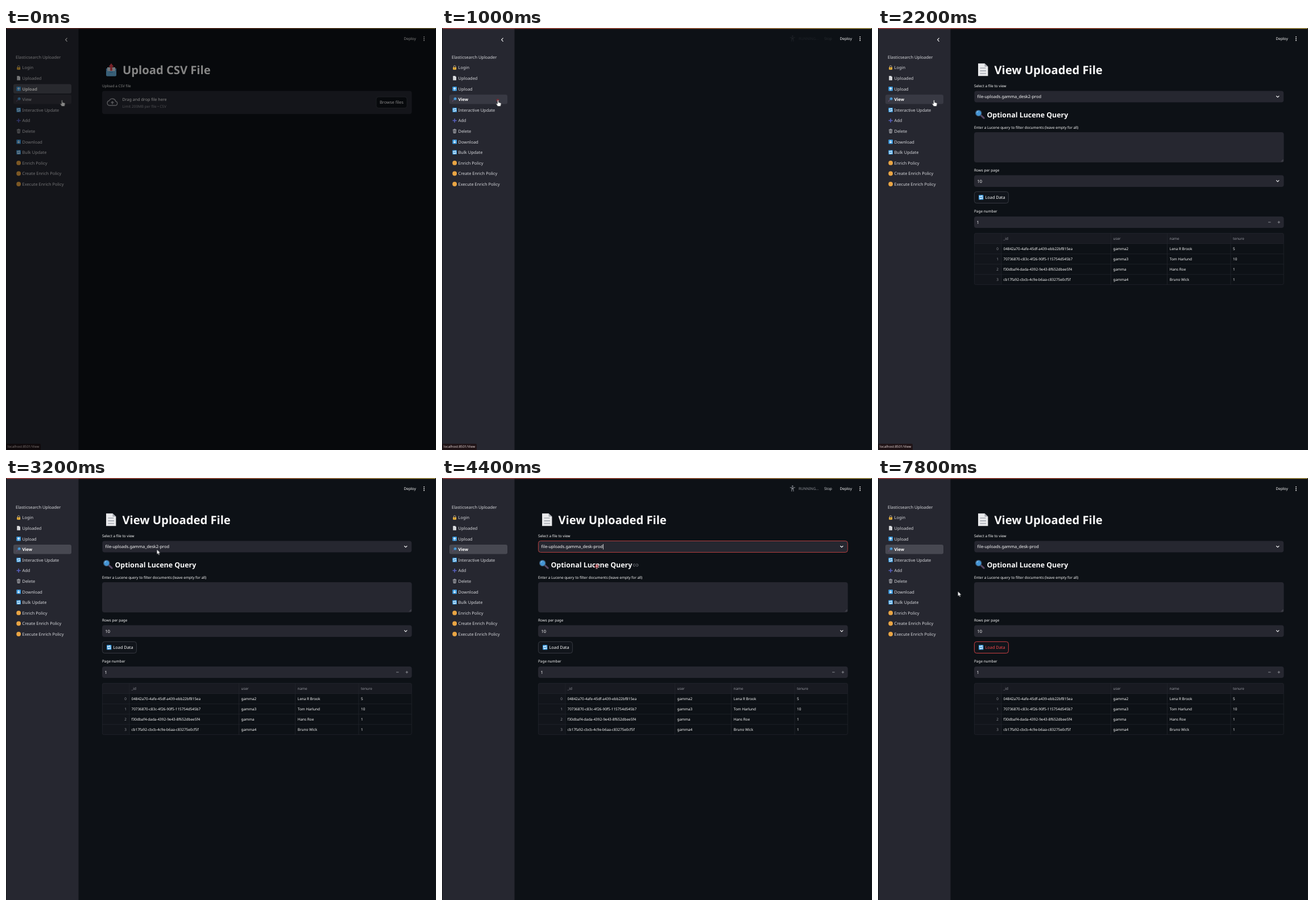
An HTML page for the animation above (8 s loop, 756 by 741 pixels).

```html
<!DOCTYPE html>
<html lang="en">
<head>
<meta charset="utf-8">
<title>Uploader demo</title>
<style>
html, body { margin: 0; width: 100%; height: 100%; overflow: hidden; background: #0d1116; }
svg { display: block; width: 756px; height: 741px; }
text { font: 6.4px "Noto Sans", "Open Sans", sans-serif; fill: #fafafa; text-rendering: geometricPrecision; white-space: pre; }
.nav text { font-size: 7.45px; fill: #d5d6da; }
.nav .on { font-weight: 600; fill: #fff; }
.body { font-size: 7.45px; }
.h1 { font-size: 20.2px; font-weight: 700; }
.h2 { font-size: 12.4px; font-weight: 600; }
.dim text, .dim { fill: #92949b; }
.end { text-anchor: end; }
.field { fill: #262730; }
.line { fill: none; stroke: #fafafa; stroke-width: 1.1; stroke-linecap: round; stroke-linejoin: round; }
.grid { fill: none; stroke: #22252d; stroke-width: .8; }

/* 8 s loop, 2.5% = one 200 ms step */
.a { animation: 8s step-end -.02s infinite; }
.early { animation-name: early; }
.late { animation-name: late; }
.page { animation-name: page; }
.table { animation-name: table; }
.run { animation-name: run; }
.bar { animation-name: bar; }
.collapse { animation-name: collapse; }
.status { animation-name: status; }
.focus { animation-name: focus; }
.menu { animation-name: menu; }
.first { animation-name: first; }
.second { animation-name: second; }
.old { animation-name: old; }
.new { animation-name: new; }
.caret { animation-name: caret; }
.load { animation-name: load; color: #fafafa; }
.load text { fill: currentColor; }
.fade { animation-name: fade; }
.ring { animation-name: ring; fill: none; stroke: #b3242d; stroke-width: 1.5; }
.ring circle { vector-effect: non-scaling-stroke; }
.cursor { animation-name: move; }
.hand { animation-name: hand; }
.arrow { animation-name: arrow; }
.beam { animation-name: caret; }

@keyframes early { 0% { opacity: 1 } 12.5% { opacity: 0 } }
@keyframes late { 0% { opacity: 0 } 12.5% { opacity: 1 } }
@keyframes page { 0% { opacity: 0 } 17.5% { opacity: 1 } }
@keyframes table { 0% { opacity: 0 } 22.5% { opacity: 1 } }
@keyframes run {
  0% { opacity: 0 } 12.5% { opacity: .14 } 15% { opacity: 1 } 25% { opacity: 0 }
  55% { opacity: 1 } 62.5% { opacity: 0 }
  75% { opacity: .14 } 77.5% { opacity: 1 } 85% { opacity: 0 }
}
@keyframes bar { 0% { fill: #34353e } 12.5% { fill: #383943 } 32.5% { fill: #474851 } }
@keyframes collapse { 0% { opacity: 1 } 32.5% { opacity: 0 } }
@keyframes status { 0% { opacity: 1 } 35% { opacity: 0 } }
@keyframes focus { 0% { stroke: transparent } 42.5% { stroke: #c64345 } 75% { stroke: transparent } }
@keyframes menu { 0% { opacity: 0 } 45% { opacity: 1 } 55% { opacity: 0 } }
@keyframes first { 0% { opacity: 1 } 50% { opacity: 0 } }
@keyframes second { 0% { opacity: 0 } 50% { opacity: 1 } }
@keyframes old { 0% { opacity: 1 } 55% { opacity: 0 } }
@keyframes new { 0% { opacity: 0 } 55% { opacity: 1 } }
@keyframes caret { 0% { opacity: 0 } 55% { opacity: 1 } 60% { opacity: 0 } }
@keyframes load { 0% { color: #fafafa; stroke: #3c3f47 } 67.5% { color: #f5484b; stroke: #e0474a } }
@keyframes fade { 0% { opacity: .47 } 2.5% { opacity: .22 } 5% { opacity: 0 } }
@keyframes hand { 0% { opacity: 1 } 32.5% { opacity: 0 } 42.5% { opacity: 1 } 55% { opacity: 0 } 67.5% { opacity: 1 } 80% { opacity: 0 } }
@keyframes arrow { 0% { opacity: 0 } 32.5% { opacity: 1 } 42.5% { opacity: 0 } 60% { opacity: 1 } 67.5% { opacity: 0 } 80% { opacity: 1 } }
@keyframes move {
  0%, 30% { transform: translate(98.5px, 127px); animation-timing-function: steps(5) }
  42.5% { transform: translate(307px, 125px); animation-timing-function: steps(2) }
  47.5% { transform: translate(244.5px, 148px); animation-timing-function: steps(3) }
  55%, 57.5% { transform: translate(272px, 155px); animation-timing-function: steps(4) }
  67.5%, 77.5% { transform: translate(184.5px, 295px); animation-timing-function: steps(5) }
  90% { transform: translate(135px, 171px); animation-timing-function: steps(3) }
  97.5%, 100% { transform: translate(140.5px, 199px) }
}
@keyframes ring {
  0% { opacity: 0; transform: translate(98px, 127px) scale(.15) }
  12.5% { opacity: .8; transform: translate(98px, 127px) scale(.15) }
  15% { opacity: .8; transform: translate(98px, 127px) scale(.6) }
  17.5% { opacity: .7; transform: translate(98px, 127px) }
  20% { opacity: 0 }
  42.5% { opacity: 1; transform: translate(307px, 126px) scale(.2) }
  45% { opacity: .9; transform: translate(307px, 126px) scale(.6) }
  47.5% { opacity: .75; transform: translate(307px, 126px) }
  50% { opacity: 0 }
  55% { opacity: 1; transform: translate(272px, 155px) scale(.2) }
  57.5% { opacity: .9; transform: translate(272px, 155px) scale(.6) }
  60% { opacity: .75; transform: translate(272px, 155px) }
  62.5% { opacity: 0 }
  75% { opacity: 1; transform: translate(185px, 297px) scale(.15) }
  77.5% { opacity: .9; transform: translate(185px, 297px) scale(.6) }
  80% { opacity: .75; transform: translate(185px, 297px) }
  82.5% { opacity: 0 }
}
</style>
</head>
<body>
<svg viewBox="0 0 756 741" width="756" height="741">
  <defs>
    <linearGradient id="strip">
      <stop offset="0" stop-color="#b8433f"/><stop offset=".5" stop-color="#b5593c"/><stop offset="1" stop-color="#c0a850"/>
    </linearGradient>
    <rect id="sq" x="-3.8" y="-3.8" width="7.6" height="7.6" rx=".8" fill="#3b9be0"/>
    <g id="up"><use href="#sq"/><path d="M0 2.4V-2M-1.8-.2 0-2 1.8-.2" class="line"/></g>
    <g id="down"><use href="#up" transform="scale(1 -1)"/></g>
    <g id="sync"><use href="#sq"/><path d="M-2.3-.4V-1.6H1.9M.9-2.5 2-1.6M2.3.4V1.6H-1.9M-.9 2.5-2 1.6" class="line" stroke-width=".9"/></g>
    <g id="lock"><path d="M-1.8 0V-1.6a1.8 1.8 0 0 1 3.6 0V0" fill="none" stroke="#b9a78a"/><rect x="-2.9" y="-.6" width="5.8" height="4.3" rx=".6" fill="#f0b840"/><circle cy="1.3" r=".8" fill="#70501c"/></g>
    <g id="doc"><path d="M-2.8-3.8H.9L2.8-1.9V3.8H-2.8Z" fill="#e9eaec"/><path d="M.9-3.8V-1.9H2.8Z" fill="#a5a9b0"/><path d="M-1.7-1H1.5M-1.7.7H1.7M-1.7 2.3H1.7" stroke="#9a9fa8" stroke-width=".45"/></g>
    <g id="lens"><path d="M1.3 1.3 6.4 6" stroke="#5b4a66" stroke-width="2.7" stroke-linecap="round"/><circle cx="-2" cy="-1.8" r="4.6" fill="#4596d6" stroke="#3a566f" stroke-width="1.2"/><path d="M-4.6-2.6A3 3 0 0 1-2.4-4.8" fill="none" stroke="#a9d5f5" stroke-width=".9"/></g>
    <g id="bin" fill="none" stroke="#b9bbc0" stroke-width=".8"><path d="M-3-2.6H3M-2.5-2.4-1.9 3.5H1.9L2.5-2.4M-.8-2V3M.8-2V3M-1.2-3.4H1.2"/></g>
    <circle id="dot" r="3.9" fill="#e9a544"/>
    <path id="chev" d="M-2.2-1 0 1.2 2.2-1" class="line"/>
  </defs>

  <rect width="756" height="741" fill="#0d1116"/>
  <rect x="1" width="126.5" height="741" fill="#262730"/>

  <g class="nav">
    <rect class="a early" x="13" y="98.5" width="102" height="16.5" rx="3" fill="#4c4d56"/>
    <rect class="a bar" x="13" y="117" width="102" height="16.5" rx="3"/>
    <text x="17" y="53.8">Elasticsearch Uploader</text>
    <use href="#lock" x="22.2" y="69.5"/><text x="28.5" y="72.4">Login</text>
    <use href="#doc" x="22.2" y="88"/><text x="28.5" y="91">Uploaded</text>
    <use href="#up" x="22.2" y="106.8"/>
    <text class="a early on" x="28.5" y="109.6">Upload</text>
    <text class="a late" x="28.5" y="109.6">Upload</text>
    <use href="#lens" transform="translate(22 125.3) scale(-.56 .56)"/>
    <text class="a early" x="28.5" y="128.2">View</text>
    <text class="a late on" x="28.5" y="128.2">View</text>
    <use href="#sync" x="22.2" y="143.9"/><text x="28.5" y="146.8">Interactive Update</text>
    <path d="M18.6 162.5H25.8M22.2 158.9V166.1" stroke="#5a62c4" stroke-width="1.5"/><text x="28.5" y="165.4">Add</text>
    <use href="#bin" x="22.2" y="181"/><text x="28.5" y="184">Delete</text>
    <use href="#down" x="22.2" y="199.7"/><text x="28.5" y="202.6">Download</text>
    <use href="#sync" x="22.2" y="218.3"/><text x="28.5" y="221.2">Bulk Update</text>
    <use href="#dot" x="22.2" y="236.9"/><text x="28.5" y="239.8">Enrich Policy</text>
    <use href="#dot" x="22.2" y="255.5"/><text x="28.5" y="258.4">Create Enrich Policy</text>
    <use href="#dot" x="22.2" y="274"/><text x="28.5" y="277">Execute Enrich Policy</text>
    <path class="a collapse line" d="M107.2 17.8 104.6 20.6 107.2 23.4"/>
  </g>

  <text x="699.5" y="21.2" style="font-size:6.5px">Deploy</text>
  <g fill="#fafafa"><circle cx="735" cy="15.6" r=".95"/><circle cx="735" cy="18.7" r=".95"/><circle cx="735" cy="21.8" r=".95"/></g>
  <g class="a run">
    <circle cx="616.3" cy="14.4" r="1.3" fill="#797c83"/>
    <path d="M611.8 16.6 616.3 17.4 620.8 16.6M616.3 17V20M615.2 17.5 614.6 23.6M617.4 17.5 618 23.6" fill="none" stroke="#797c83" stroke-width="1.2"/>
    <text class="dim" x="627" y="21.2">RUNNING...</text>
    <text x="672" y="21.2" style="font-size:6.5px;fill:#d0d1d4">Stop</text>
  </g>

  <g class="a early">
    <path d="M176 71H194V82.5a2 2 0 0 1-2 2H178a2 2 0 0 1-2-2Z" fill="#4b9bd2"/>
    <path d="M178 69H192V76H178Z" fill="#d6dde3"/>
    <path d="M176 75.5H181L182.5 78.5H187.5L189 75.5H194V82.5a2 2 0 0 1-2 2H178a2 2 0 0 1-2-2Z" fill="#69b2e0"/>
    <path d="M185 62 189.5 68H186.8V75H183.2V68H180.5Z" fill="#df3f4c"/>
    <text class="h1" x="205" y="81">Upload CSV File</text>
    <text x="169" y="104.4">Upload a CSV file</text>
    <rect class="field" x="169" y="110.5" width="544.5" height="40.5" rx="4"/>
    <path d="M182 136H192a3.7 3.7 0 0 0 .8-7.3 6 6 0 0 0-11.2-1.2A4.3 4.3 0 0 0 182 136ZM187 134V129.4M184.7 131.4 187 129.2 189.3 131.4" fill="none" stroke="#a7a9af" stroke-width="1.4"/>
    <text x="204.5" y="127.6" style="font-size:7.15px">Drag and drop file here</text>
    <text class="dim" x="204.5" y="139.9">Limit 200MB per file • CSV</text>
    <rect x="651" y="121" width="54" height="19.5" rx="4" fill="#0e1117" stroke="#3c3f47" stroke-width=".8"/>
    <text class="body" x="657" y="133.3">Browse files</text>
  </g>

  <g class="a page">
    <use href="#doc" transform="translate(184.7 73.2) scale(3.1 2.9)"/>
    <text class="h1" x="204.5" y="81">View Uploaded File</text>
    <text x="169" y="104.4">Select a file to view</text>
    <rect class="a focus field" x="169.4" y="110.5" width="543.8" height="20" rx="4" stroke="transparent" stroke-width=".9"/>
    <text class="a old body" x="174.5" y="123.3">file-uploads.gamma_desk2-prod</text>
    <text class="a new body" x="174.5" y="123.3">file-uploads.gamma_desk-prod</text>
    <path class="a caret" d="M283.6 116V125.5" stroke="#fafafa" stroke-width=".8"/>
    <use href="#chev" x="702.7" y="120.5"/>

    <use href="#lens" transform="translate(179 151.5) scale(1.12)"/>
    <text class="h2" x="191.5" y="156.6">Optional Lucene Query</text>
    <path class="a caret" d="M339.6 151H338a2 2 0 0 0 0 4H339.6M341.4 151H343a2 2 0 0 1 0 4H341.4M338.8 153H342.2" fill="none" stroke="#85878e" stroke-width=".8"/>
    <text x="169" y="177.2">Enter a Lucene query to filter documents (leave empty for all)</text>
    <rect class="field" x="169" y="183" width="544.5" height="53" rx="4"/>
    <path d="M709 234.5 712.5 231M711 234.7 712.7 233" stroke="#777980" stroke-width=".6"/>

    <text x="169" y="252.2">Rows per page</text>
    <rect class="field" x="169" y="258.5" width="544.5" height="20.5" rx="4"/>
    <text class="body" x="174.5" y="271.5">10</text>
    <use href="#chev" x="702.7" y="268.6"/>

    <g class="a load">
      <rect x="169.4" y="287.4" width="60" height="20.2" rx="4" fill="#11151b" stroke-width=".9"/>
      <g stroke="none"><use href="#sq" x="181.2" y="297.4"/><text x="188.5" y="300.1" style="font-size:7.35px">Load Data</text></g>
    </g>
    <use href="#sync" transform="translate(181.2 297.4) scale(1.08)"/>

    <text x="169" y="324.2">Page number</text>
    <rect class="field" x="169" y="331" width="544.5" height="20" rx="4"/>
    <text class="body" x="173.5" y="343.7">1</text>
    <path d="M686 341H690.5M702.5 341H707M704.75 338.75V343.25" stroke="#a0a2a8" stroke-width=".8"/>
  </g>

  <g class="a table">
    <rect x="169" y="360" width="544.5" height="18.5" rx="3" fill="#181a21"/>
    <rect x="169" y="378.5" width="48" height="72" fill="#12151b"/>
    <rect class="grid" x="169.4" y="360.4" width="543.8" height="90.2" rx="3"/>
    <path class="grid" d="M169 378.5H713M169 396.7H713M169 414.7H713M169 432.8H713M217 360V451M409.5 360V451M508.5 360V451M620 360V451"/>
    <g class="dim">
      <text x="220.5" y="372.3">_id</text><text x="413.5" y="372.3">user</text><text x="512.5" y="372.3">name</text><text x="624" y="372.3">tenure</text>
      <text class="end" x="212" y="390.2">0</text><text class="end" x="212" y="408.3">1</text><text class="end" x="212" y="426.3">2</text><text class="end" x="212" y="444.3">3</text>
    </g>
    <text x="220.5" y="390.2">04842a70-4afe-45df-a439-ebb22bf815ea</text><text x="413.5" y="390.2">gamma2</text><text x="512.8" y="390.2">Lena R Brook</text><text x="624" y="390.2">5</text>
    <text x="220.5" y="408.3">70736870-c83c-4f26-90f5-115754d545b7</text><text x="413.5" y="408.3">gamma3</text><text x="512.8" y="408.3">Tom Harlund</text><text x="624" y="408.3">10</text>
    <text x="220.5" y="426.3">f30dbaf4-dada-4392-9e43-8f652dbee5f4</text><text x="413.5" y="426.3">gamma</text><text x="512.8" y="426.3">Hans Roe</text><text x="624" y="426.3">1</text>
    <text x="220.5" y="444.3">cb17fa92-cbcb-4c9e-b6aa-c83275e0cf5f</text><text x="413.5" y="444.3">gamma4</text><text x="512.8" y="444.3">Bruno Wick</text><text x="624" y="444.3">1</text>
  </g>

  <g class="a menu">
    <rect x="169" y="131" width="544.5" height="40" fill="#0d1116"/>
    <rect class="a first" x="169" y="131.5" width="544.5" height="20" fill="#1b1d25"/>
    <rect class="a second" x="169" y="151.5" width="544.5" height="20" fill="#1b1d25"/>
    <text class="body" x="177" y="143.6">file-uploads.gamma_desk2-prod</text>
    <text class="body" x="177" y="164.2">file-uploads.gamma_desk-prod</text>
  </g>

  <g class="a status">
    <path d="M0 730H59a2 2 0 0 1 2 2V741H0Z" fill="#1f1316"/>
    <text x="3" y="737.4" style="font-size:5.95px;fill:#e3d3d3">localhost:8501/View</text>
  </g>

  <rect width="756" height="1.3" fill="url(#strip)"/>
  <path d="M.5 0V741M755.5 0V741" stroke="#15171a"/>

  <g class="a ring"><circle r="10"/></g>
  <g class="a cursor">
    <path class="a hand" d="M-1-.2Q0-1.2 1-.2V3.6L4.6 4.5Q5.6 5 5.4 6.2L4.6 10.6H-.6L-3.2 6.4Q-3.4 5.2-2.2 5.4L-1 6.4Z" fill="#fff" stroke="#16181c" stroke-width=".6"/>
    <path class="a arrow" d="M0 0V8.6L2-6.8 2 6.8 3.4 9.8 4.8 9.2 3.5 6.3H6Z" fill="none"/>
    <path class="a arrow" d="M0 0V8.6L1.9 6.8 3.2 9.8 4.6 9.2 3.4 6.2H6Z" fill="#fff" stroke="#16181c" stroke-width=".5"/>
    <path class="a beam" d="M-1.5-4H1.5M0-4V4M-1.5 4H1.5" fill="none" stroke="#e6d4d6" stroke-width=".8"/>
  </g>

  <rect class="a fade" width="756" height="741"/>
</svg>
</body>
</html>
```
